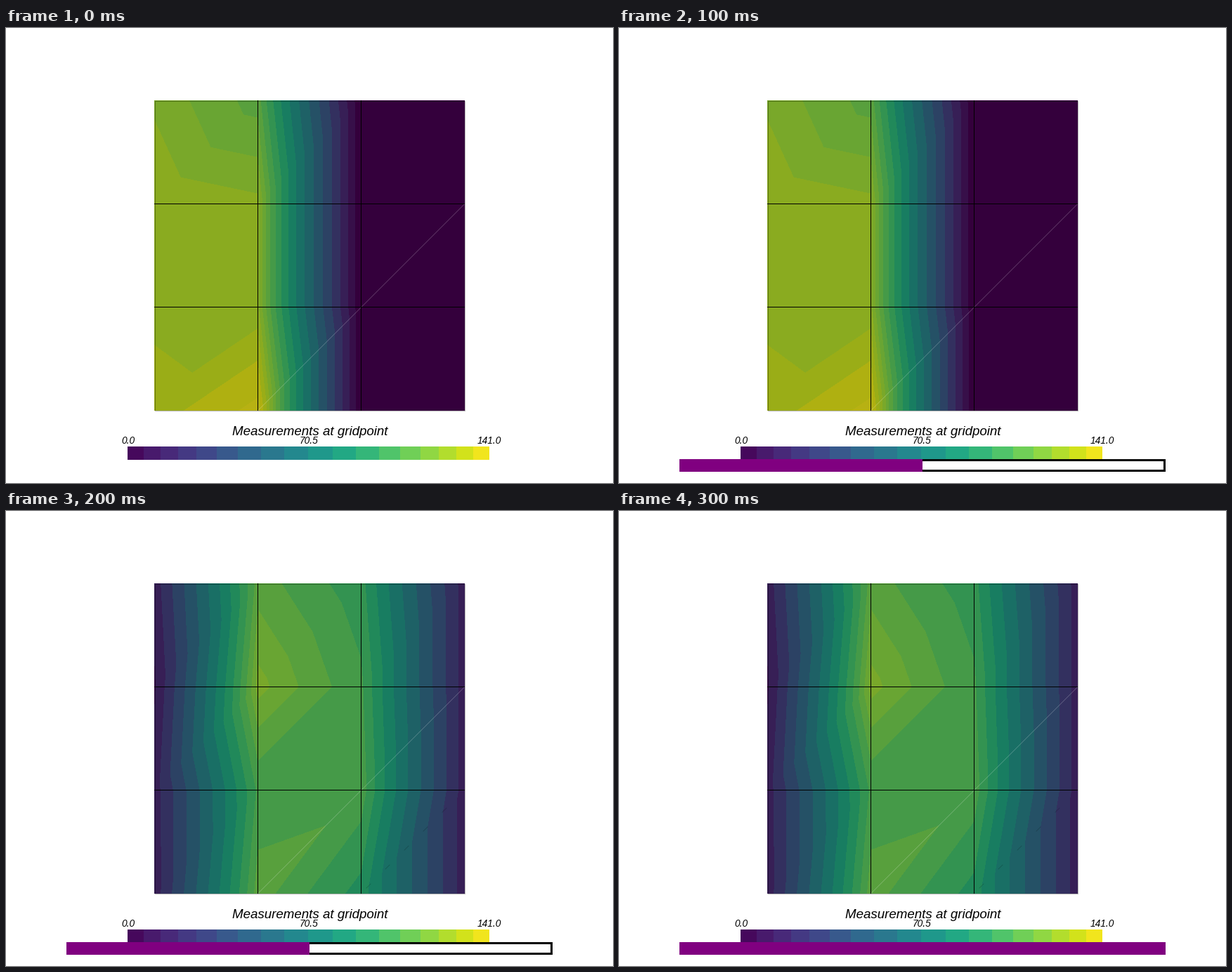
A matplotlib script that plays this animation: 864 px wide and 648 px high, repeating every 400 ms.

```python
import numpy as np
import matplotlib.pyplot as plt
from matplotlib.animation import FuncAnimation
from matplotlib.patches import Rectangle

W, H = 864, 648
LEFT, TOP, SIZE = 211, 103, 442
CELL = SIZE / 3
viridis = plt.get_cmap("viridis")


def grid(right, *rows):
    """Values at the 4 x 4 grid points; the last column is constant."""
    return np.array([[*row, right] for row in rows])


FIELDS = [
    grid(0, (.854, .785, 0), (.8855, .868, 0), (.882, .868, 0), (.901, .970, 0)),
    grid(.138, (.134, .784, .69), (.1, .844, .73), (.138, .73, .75),
         (.135, .786, .647)),
]

# Band limits: wide in the middle, narrow towards the top value
u = np.arange(1, 19) / 19
LEVELS = u + .14 * np.sin(np.pi * u) ** 2 - .018 * np.sin(2 * np.pi * u)

# Lit viridis, sampled from the low end of the first band to the high end of the last
TONES = np.linspace(np.r_[0, LEVELS], np.r_[LEVELS, .97], 101)
weights = np.linspace(0, 100, len(LEVELS) + 1).astype(int)
TONES = TONES[weights, np.arange(len(weights))]
SHADES = viridis(TONES)[:, :3] * (.775, .775, .72)


def shade(z):
    """Linear interpolation on split cells, painted in flat bands."""
    t = (np.arange(SIZE) + 0.5) / CELL
    n = np.minimum(t.astype(int), 2)
    f = t - n
    i, j = np.meshgrid(n, n, indexing="ij")
    fy, fx = np.meshgrid(f, f, indexing="ij")
    tl, tr, bl, br = z[i, j], z[i, j + 1], z[i + 1, j], z[i + 1, j + 1]
    upper = tl + fx * (tr - tl) + fy * (bl - tl)
    lower = br + (1 - fx) * (bl - br) + (1 - fy) * (tr - br)
    return SHADES[np.digitize(np.where(fx + fy < 1, upper, lower), LEVELS)]


fig = plt.figure(figsize=(W / 72, H / 72), dpi=72, facecolor="white")
ax = fig.add_axes([0, 0, 1, 1])
ax.axis("off")

images = [shade(z) for z in FIELDS]
surface = ax.imshow(images[0], extent=(LEFT, LEFT + SIZE, TOP + SIZE, TOP),
                    interpolation="nearest", aspect="auto")
ax.set_xlim(0, W)
ax.set_ylim(H, 0)


def box(x0, y0, x1, y1, color, z=3):
    patch = Rectangle((x0, y0), x1 - x0, y1 - y0, facecolor=color,
                      edgecolor="none", antialiased=False, zorder=z)
    return ax.add_patch(patch)


def label(x, y, text, size):
    ax.text(x, y, text, size=size, style="italic", family="Liberation Sans",
            ha="center", va="baseline", color="black", zorder=4)


# Small ticks where bands cross the diagonal of the last cell
ticks = []
for x in range(516, 625, 27):
    ticks += ax.plot([x - 3, x + 3], [1053 - x, 1047 - x], color="black",
                     lw=0.8, alpha=0.2, zorder=2)

ax.plot([LEFT + CELL, LEFT + SIZE], [TOP + SIZE, TOP + CELL],
        color="white", lw=0.7, alpha=0.28, zorder=2)
for k in (1, 2):
    x, y = int(LEFT + k * CELL), int(TOP + k * CELL)
    box(x, TOP, x + 1, TOP + SIZE, "black")
    box(LEFT, y, LEFT + SIZE, y + 1, "black")
ax.add_patch(Rectangle((LEFT + 0.5, TOP + 0.5), SIZE - 1, SIZE - 1, fill=False,
                       edgecolor="black", lw=1, alpha=0.3, zorder=3))

# Scalar bar, with slightly narrower bands at both ends
v = np.linspace(0, 1, 19)
edges = v - .2 * np.sin(2 * np.pi * v) / (2 * np.pi)
for a, b in zip(edges, edges[1:]):
    box(round(173 + 515 * a), 596, round(173 + 515 * b), 615, viridis((a + b) / 2))
label(432.3, 580, "Measurements at gridpoint", 18.75)
for share in (0, 0.5, 1):
    label(173.5 + 514.5 * share, 592, f"{141 * share:.1f}", 13.7)

# Progress bar
frame_box = box(86, 614, 778, 632, "black", 5)
inner = box(89, 617, 775, 629, "white", 6)
fill = box(86, 614, 86, 632, "#800080", 7)


def update(n):
    second = n >= 2
    surface.set_data(images[int(second)])
    for t in ticks:
        t.set_visible(second)
    share = (n + 1) // 2 / 2
    for p in (frame_box, inner, fill):
        p.set_visible(share > 0)
    fill.set_width(692 * share)
    return [surface, frame_box, inner, fill, *ticks]


anim = FuncAnimation(fig, update, frames=4, interval=100, repeat=True,
                     repeat_delay=0, init_func=lambda: update(0), blit=False)
plt.show()
```
